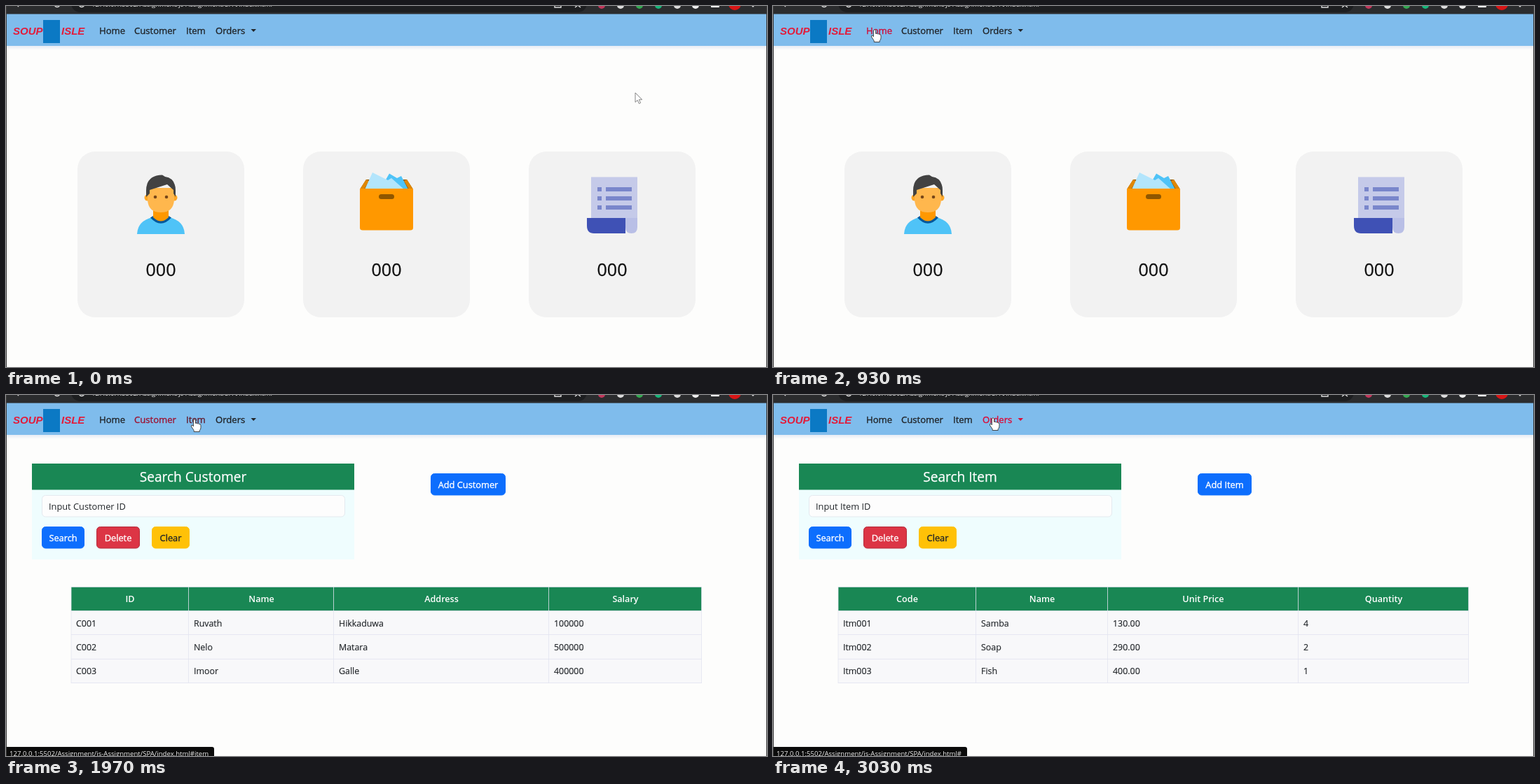
Animation of 1086x516 px, one loop 3.06 s. Source, as an HTML page:

```html
<!DOCTYPE html>
<html lang="en">
<head>
<meta charset="utf-8">
<title>Shop dashboard</title>
<style>
  html, body { margin: 0; width: 100%; height: 100%; overflow: hidden; background: #fdfdfc; }
  svg { display: block; width: 100%; height: 100%; }
  text { font-family: "Open Sans", "Noto Sans", sans-serif; font-size: 12.8px; color: #212529; fill: currentColor; white-space: pre; }
  .med { stroke: currentColor; stroke-width: .35px; }
  .nav { font-size: 13.1px; }
  .mid { text-anchor: middle; }
  .white { color: #fff; }
  .title { font-size: 19.1px; color: #fff; stroke: #fff; stroke-width: .25px; }
  .cell { font-size: 12.4px; stroke: currentColor; stroke-width: .15px; }
  .head { font-size: 12.6px; font-weight: 600; color: #fff; }
  .count { font-size: 25px; color: #111; stroke: #111; stroke-width: .3px; }
  .brand { font: italic bold 15px "Liberation Sans", Arial, sans-serif; color: #e31b3a; }
  .url { font-size: 9.58px; color: #eee; }
</style>
</head>
<body>
<svg id="stage" viewBox="0 0 1086 516" preserveAspectRatio="none">
  <defs>
    <linearGradient id="shade" x2="0" y2="1">
      <stop offset="0" stop-color="#e6ebf4"/>
      <stop offset="1" stop-color="#fdfdfc"/>
    </linearGradient>
  </defs>
  <rect width="1086" height="516" fill="#fdfdfc"/>
  <g id="home"></g>
  <g id="customer"></g>
  <g id="item"></g>
  <g id="bar"></g>
  <g id="status">
    <path id="tip" fill="#0b0b0b"/>
    <text id="link" class="url" x="5" y="516"></text>
  </g>
  <path d="M.5 0V516M1085.5 0V516" stroke="#3a3a3a"/>
  <g id="cursor">
    <path id="arrow" d="M0 0V13.5L3.2 10.6L5.4 15.5L7.6 14.5L5.4 9.8H9.7Z" fill="#fff" stroke="#777" stroke-width=".9" stroke-linejoin="round"/>
    <path id="hand" d="M-1.6 1.3Q0-.9 1.6 1.3V6Q3.2 4.8 4.3 6.5Q6 5.6 6.8 7.2Q9 6.7 9 9V12Q9 14.8 7.2 16.2V18H-.8V16.2L-4.6 10.5Q-4.8 8.2-2.8 8.8L-1.6 10.3Z" fill="#fff" stroke="#333" stroke-width=".9" stroke-linejoin="round"/>
  </g>
</svg>
<script>
const $ = id => document.getElementById(id);
const add = (id, markup) => $(id).insertAdjacentHTML("beforeend", markup);
const rect = (x, y, w, h, fill, r = 0, more = "") =>
  `<rect x="${x}" y="${y}" width="${w}" height="${h}" rx="${r}" fill="${fill}" ${more}/>`;
const shape = (d, fill, more = "") => `<path d="${d}" fill="${fill}" ${more}/>`;
const dot = (x, y, r, fill) => `<circle cx="${x}" cy="${y}" r="${r}" fill="${fill}"/>`;
const label = (x, y, cls, str, id = "") => `<text x="${x}" y="${y}" class="${cls}" id="${id}">${str}</text>`;

const BASE = "127.0.0.1:5502/Assignment/js-Assignment/SPA/index.html";

// Browser strip and navigation
function drawBar() {
  let out = rect(0, 0, 1086, 12, "#2b2c2e") + rect(93, -18, 736, 27, "#1d1e20", 13)
    + label(122, 1, "url", BASE)
    + shape("M14-3L18 1M73-3M69-1Q73 4 77-1M104-1Q108 4 112-1M783-4V2H792V-4M812 2L816-1L820 2", "none", 'stroke="#ddd" stroke-width="1.4"');
  const dots = [[850, "#c2385c"], [877, "#ddd"], [904, "#35a852"], [931, "#18b67a"], [958, "#ddd"], [984, "#eee"]];
  for (const [x, fill] of dots) out += dot(x, -1, 5, fill);
  out += rect(1006, -6, 12, 8, "#fff", 1) + dot(1040, -3, 9, "#d81616") + dot(1066, 0, 1.5, "#ddd");
  out += rect(0, 57, 1086, 6, "url(#shade)") + rect(0, 11.5, 1086, 45.5, "#7fbcec");
  out += label(10, 41, "brand", "SOUP") + rect(53, 20, 24, 33, "#0b79c4") + label(79, 41, "brand", "ISLE");
  [["Home", 133], ["Customer", 183], ["Item", 257], ["Orders", 299]].forEach(([name, x], i) => {
    out += label(x, 39.5, "med nav", name, "nav" + i);
  });
  add("bar", out + '<path id="caret" d="M349.5 33H357L353.2 37Z"/>');
}

const person = () =>
  shape("M187 326Q188 307 209 302H233Q254 307 255 326Z", "#4fc3f7")
  + shape("M206 302.5Q221 319 236 302.5L232 300H210Z", "#01579b")
  + shape("M210 288H232V302Q221 313 210 302Z", "#ff9800")
  + dot(202, 274, 4.5, "#ffa726") + dot(240, 274, 4.5, "#ffa726")
  + shape("M202 260H240V277Q239 295 221 295Q203 295 202 277Z", "#ffb74d")
  + shape("M200 273V264Q200 242 223 241.5L227 244Q242 246 242 264V273L239 268V263L230 255L205 263V268Z", "#424242")
  + dot(213, 273, 2.3, "#784719") + dot(229, 273, 2.3, "#784719");

const box = () =>
  shape("M505 262L514 248H572L581 262Z", "#8f5700")
  + shape("M505 262L514 248L518 250L511 262ZM581 262L572 248L568 250L575 262Z", "#e08700")
  + shape("M534 262L547 239.5L558 246L564 243L574 262Z", "#4fc3f7")
  + shape("M512 262L523 238L545 249L550 246L568 262Z", "#b3e5fc")
  + shape("M505 261H581V317Q581 320.5 577 320.5H509Q505 320.5 505 317Z", "#ff9800")
  + rect(532, 269, 22, 7, "#8f5700", 3.5);

function sheet() {
  let out = rect(835, 244.5, 66, 66, "#c5cae9")
    + shape("M829 303H884V325H839Q829 325 829 314Z", "#3f51b5")
    + shape("M884 303H901V316Q901 325 892.5 325Q884 325 884 316Z", "#b9bfe6");
  for (const y of [259, 272, 285]) out += rect(844, y, 6, 6, "#7986cb") + rect(856, y, 37, 6, "#7986cb");
  return out;
}

function drawHome() {
  [person, box, sheet].forEach((icon, i) => {
    const x = 102 + 322 * i;
    add("home", rect(x, 208, 238, 237, "#f2f2f2", 25) + icon() + label(x + 119, 386, "count mid", "000"));
  });
}

const button = (x, y, w, fill, str, cls = "white", edge = fill) =>
  rect(x + .5, y + .5, w - 1, 30.5, fill, 5, `stroke="${edge}"`) + label(x + w / 2, y + 20.5, "med mid " + cls, str);

// Search panel and table share one layout
function drawPage(id, name, addWidth, cols, heads, rows) {
  let out = rect(37, 98, 460, 137, "#effdfe") + rect(37, 98, 460, 37.5, "#198754")
    + label(267, 124, "title mid", "Search " + name)
    + rect(51.5, 143.5, 432, 30.5, "#fdfdfd", 5, 'stroke="#e4eaf0"')
    + label(61, 163.5, "", `Input ${name} ID`)
    + button(51, 188, 61, "#0d6efd", "Search")
    + button(129, 188, 62, "#dc3545", "Delete", "white", "#b52a3a")
    + button(208, 188, 54, "#ffc107", "Clear", "")
    + button(606, 112, addWidth, "#0d6efd", "Add " + name)
    + rect(93, 274, 900, 138, "#f8f8fa") + rect(93, 274, 900, 34.5, "#198754");
  const right = [...cols.slice(1), 993];
  heads.forEach((h, i) => out += label((cols[i] + right[i]) / 2, 296, "head mid", h));
  rows.forEach((row, r) => row.forEach((str, i) =>
    out += label(cols[i] + 7, 330.5 + 34.4 * r, "cell", str)));
  const lines = [274.5, 308.5, 342.5, 377.5, 411.5].map(y => `M93 ${y}H993`).join("")
    + [93.5, ...right].map(x => `M${x - .5} 274V412`).join("");
  add(id, out + shape(lines, "none", 'stroke="#e2e4f0" stroke-width=".8"'));
}

drawBar();
drawHome();
drawPage("customer", "Customer", 107, [93, 261, 468, 775], ["ID", "Name", "Address", "Salary"], [
  ["C001", "Ruvath", "Hikkaduwa", "100000"],
  ["C002", "Nelo", "Matara", "500000"],
  ["C003", "Imoor", "Galle", "400000"]
]);
drawPage("item", "Item", 77, [93, 290, 478, 750], ["Code", "Name", "Unit Price", "Quantity"], [
  ["Itm001", "Samba", "130.00", "4"],
  ["Itm002", "Soap", "290.00", "2"],
  ["Itm003", "Fish", "400.00", "1"]
]);

const LOOP = 3060, FADE = 150;
// time, x, y of the pointer tip
const path = [
  [0, 898, 124], [30, 897, 124], [440, 212, 118], [530, 205, 117], [600, 202, 114],
  [790, 150, 50], [890, 145, 33.5], [1420, 146, 33], [1620, 208, 31], [1820, 209, 31.5],
  [1965, 269, 34.5], [2400, 271, 35], [2575, 304, 32.5], [2750, 312, 32], [3060, 314, 32.5]
];
// time each menu entry is entered, its link and the width of the link tip
const hover = [
  [790, "#home", 302], [1520, "#customer", 318], [1920, "#item", 297], [2555, "#", 277]
];
const views = [["home", 0], ["customer", 1800], ["item", 2190], ["", LOOP]];
const dark = [33, 37, 41], red = [220, 10, 55];

const clamp = v => Math.min(1, Math.max(0, v));
const show = (el, on) => el.style.display = on ? "" : "none";

function pointer(t) {
  const i = Math.max(1, path.findIndex(p => p[0] > t));
  const [t0, x0, y0] = path[i - 1], [t1, x1, y1] = path[i];
  const u = clamp((t - t0) / (t1 - t0)), k = u * u * (3 - 2 * u);
  return [x0 + (x1 - x0) * k, y0 + (y1 - y0) * k];
}

function draw(t) {
  const [x, y] = pointer(t);
  $("cursor").setAttribute("transform", `translate(${x} ${y})`);
  const over = t >= hover[0][0];
  show($("arrow"), !over);
  show($("hand"), over);

  hover.forEach(([start], i) => {
    const end = i < 3 ? hover[i + 1][0] : LOOP;
    const k = clamp((t - start) / FADE) - clamp((t - end) / FADE);
    const color = `rgb(${dark.map((d, c) => Math.round(d + (red[c] - d) * k))})`;
    $("nav" + i).style.color = color;
    if (i === 3) $("caret").style.fill = color;
  });

  for (let i = 0; i < 3; i++) show($(views[i][0]), t >= views[i][1] && t < views[i + 1][1]);

  show($("status"), t >= 1250);
  const [, hash, w] = hover.filter(h => h[0] <= t).pop() || hover[0];
  $("link").textContent = BASE + hash;
  $("tip").setAttribute("d", `M0 503H${w - 3}Q${w} 503 ${w} 506V516H0Z`);
}

const begin = performance.now();
function tick() {
  draw((performance.now() - begin) % LOOP);
  requestAnimationFrame(tick);
}
tick();
</script>
</body>
</html>
```
